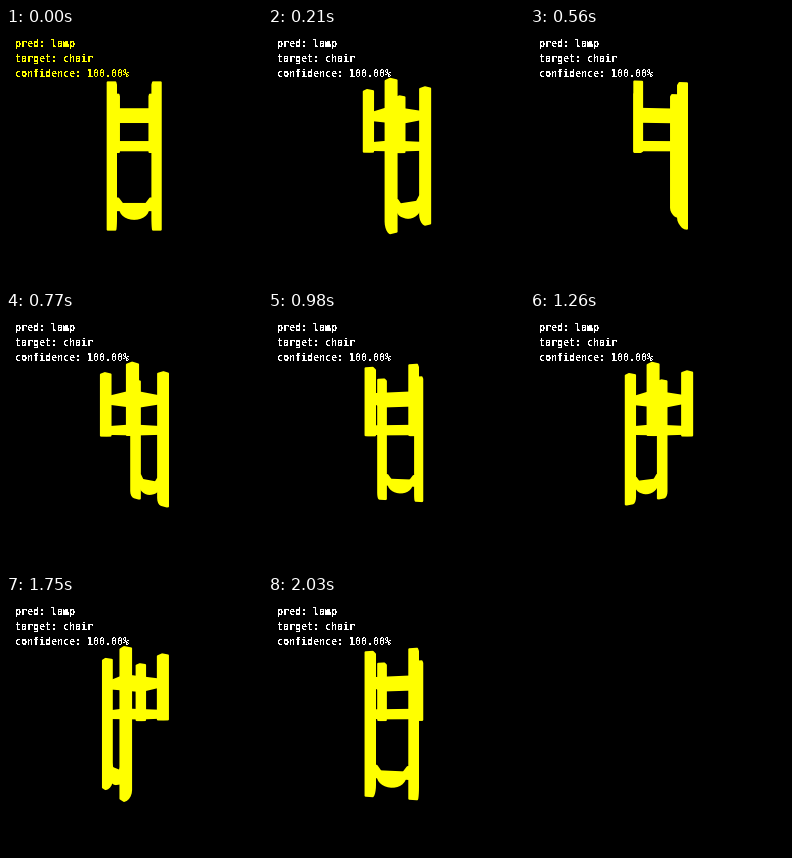
A matplotlib script that plays this animation: 256 px wide and 256 px high, repeating every 2100 ms.

```python
import numpy as np
import matplotlib.pyplot as plt
from matplotlib.animation import FuncAnimation
from matplotlib.patches import Polygon

SIZE, DPI = 256, 100
FRAMES, INTERVAL = 30, 70
CENTER_X, CENTER_Y, FOCAL, DISTANCE = 128.2, 128, 226, 10.8
LEG, HALF = 0.97, 0.165
YELLOW = "#ffff00"
LINES = ["pred: lamp", "target: chair", "confidence: 100.00%"]


def prism(profile, z0, z1):
    """Extrude a convex (x, y) profile along z."""
    return np.array([(x, y, z) for z in (z0, z1) for x, y in profile])


def box(x0, x1, y0, y1, z0, z1):
    return prism([(x0, y0), (x1, y0), (x1, y1), (x0, y1)], z0, z1)


def front_leg(x):
    return box(x - HALF, x + HALF, 0.21, 3.15, -LEG - HALF, -LEG + HALF)


def back_post(x):
    """Long post whose lower end is rounded on the inner side."""
    inner, outer = LEG - HALF, LEG + HALF
    t = np.linspace(0, np.pi / 2, 6)
    side = [(outer, 3.15), (inner, 3.15)]
    side += list(zip(outer - 2 * HALF * np.cos(t), -2.75 - 0.4 * np.sin(t)))
    return np.array([(x + dx, y, z) for dx in (-HALF, HALF) for z, y in side])


def build_chair():
    parts = [leg(x) for leg in (back_post, front_leg) for x in (-LEG, LEG)]
    parts.append(box(-1.08, 1.08, 0.3, 0.6, -1.08, 1.08))
    parts.append(box(-1.04, 1.04, 1.78, 2.02, -1.04, 1.04))
    # Crest of the back: a rounded belly with an ear at each post
    arc = np.linspace(np.pi, 2 * np.pi, 15)
    belly = [(-0.58, -2.1), (0.58, -2.1)]
    belly += [(0.6 * np.cos(t), -2.28 + 0.43 * np.sin(t)) for t in arc]
    parts.append(prism(belly, 0.9, 1.06))
    for side in (-1, 1):
        ear = [(0.9, -1.86), (0.7, -1.86), (0.52, -2.1), (0.57, -2.33), (0.9, -2.34)]
        parts.append(prism([(side * x, y) for x, y in ear], 0.9, 1.06))
    return parts


def project(points, angle):
    x, y, z = points.T
    c, s = np.cos(angle), np.sin(angle)
    scale = FOCAL / (DISTANCE - (z * c - x * s))
    return np.column_stack([CENTER_X + (x * c + z * s) * scale, CENTER_Y - y * scale])


def hull(points):
    """Convex outline by the monotone chain method."""
    def chain(pts):
        out = []
        for p in pts:
            while len(out) > 1:
                a, b = out[-2], out[-1]
                if (b[0] - a[0]) * (p[1] - a[1]) - (b[1] - a[1]) * (p[0] - a[0]) > 0:
                    break
                out.pop()
            out.append(p)
        return out[:-1]

    pts = sorted(map(tuple, points))
    return chain(pts) + chain(pts[::-1])


fig = plt.figure(figsize=(SIZE / DPI, SIZE / DPI), dpi=DPI, facecolor="black")
ax = fig.add_axes([0, 0, 1, 1])
ax.set(xlim=(0, SIZE), ylim=(SIZE, 0))
ax.axis("off")

chair = build_chair()
shapes = [
    ax.add_patch(Polygon(hull(project(part, 0)), closed=True, facecolor=YELLOW,
                         edgecolor=YELLOW, linewidth=2 * 72 / DPI, joinstyle="round"))
    for part in chair
]
labels = [
    ax.text(9.2, 19 + 15 * i, line, family="DejaVu Sans Mono", weight="bold",
            size=10 * 72 / DPI, color="white", va="baseline", antialiased=False)
    for i, line in enumerate(LINES)
]


def update(i):
    angle = 2 * np.pi * i / FRAMES
    for shape, part in zip(shapes, chair):
        shape.set_xy(hull(project(part, angle)))
    for label in labels:
        label.set_color(YELLOW if i == 0 else "white")
    return shapes + labels


anim = FuncAnimation(fig, update, frames=FRAMES, interval=INTERVAL,
                     repeat=True, repeat_delay=0)
plt.show()
```
